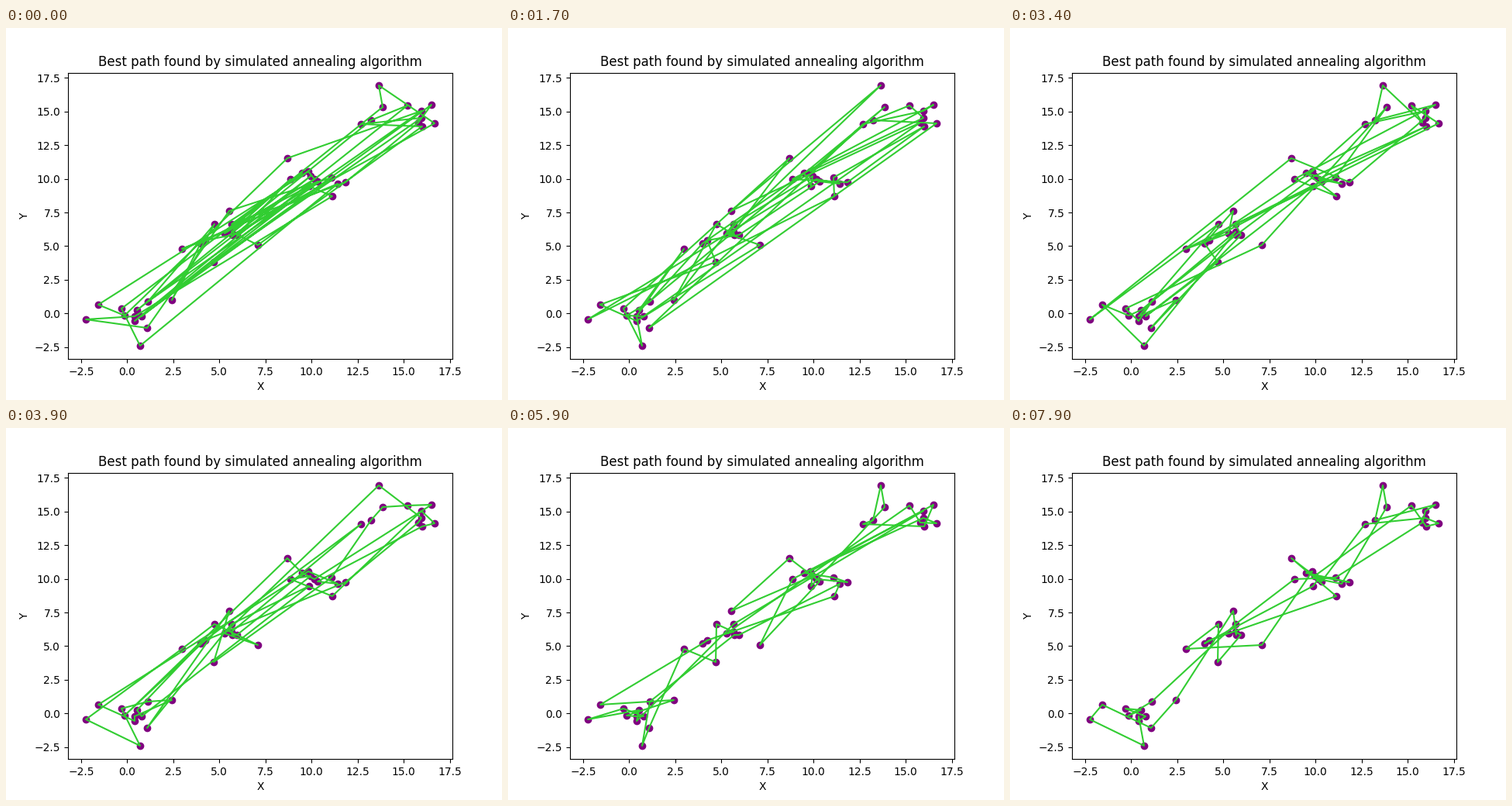
A matplotlib script for the animation above (8 s loop, 640 by 480 pixels).

```python
import random

import numpy as np
import matplotlib.pyplot as plt
from matplotlib.animation import FuncAnimation

FRAMES, INTERVAL = 80, 100
TRIALS = 200                     # proposed moves per frame
FIRST_LENGTH, LAST_LENGTH = 400, 130

# City positions on the 640 x 480 stage, one group per cluster
south = [(103, 376), (119, 357), (149, 362), (153, 371), (166, 372), (166, 378),
         (169, 364), (175, 372), (183, 353), (182, 387), (173, 410), (214, 351)]
lower = [(227, 285), (251, 278), (257, 274), (268, 302), (269, 253), (282, 265),
         (291, 253), (292, 267), (298, 267), (288, 236), (325, 280), (291, 263)]
upper = [(363, 168), (367, 195), (382, 187), (390, 185), (391, 204), (393, 191),
         (398, 195), (402, 198), (420, 193), (421, 217), (428, 201), (438, 199)]
north = [(458, 124), (471, 119), (481, 74), (486, 102), (518, 100), (532, 122),
         (536, 107), (536, 116), (537, 127), (549, 99), (553, 123)]


def to_data(px, py):
    return (px - 156.3) / 23.8, (368.2 - py) / 17.36


cities = np.array([to_data(*p) for p in south + lower + upper + north])
gaps = np.linalg.norm(cities[:, None] - cities[None], axis=2)


def length(route):
    return gaps[route, np.roll(route, -1)].sum()


def anneal():
    """Reverse random stretches while the tour stays under a falling limit."""
    rng = random.Random(7)
    n = len(cities)
    route = list(range(n))
    rng.shuffle(route)
    total = length(route)
    history = []
    for frame in range(FRAMES):
        progress = frame / (FRAMES - 1)
        limit = FIRST_LENGTH * (LAST_LENGTH / FIRST_LENGTH) ** progress
        for _ in range(TRIALS):
            i, j = sorted(rng.sample(range(n), 2))
            a, b = route[i - 1], route[i]
            c, d = route[j], route[(j + 1) % n]
            if a == c:
                continue
            change = gaps[a, c] + gaps[b, d] - gaps[a, b] - gaps[c, d]
            if total + change <= max(total, limit):
                route[i:j + 1] = route[i:j + 1][::-1]
                total += change
        history.append(route[:])
    return history


routes = anneal()

fig, ax = plt.subplots(figsize=(6.4, 4.8), dpi=100)
ax.scatter(*cities.T, color="purple")
path, = ax.plot([], [], color="limegreen", lw=1.5)
ax.set_title("Best path found by simulated annealing algorithm")
ax.set_xlabel("X")
ax.set_ylabel("Y")
(left, top), (right, bottom) = to_data(80, 57.6), to_data(576, 427.2)
ax.set_xlim(left, right)
ax.set_ylim(bottom, top)


def update(frame):
    route = routes[frame]
    path.set_data(*cities[route + route[:1]].T)
    return path,


anim = FuncAnimation(fig, update, frames=FRAMES, interval=INTERVAL,
                     repeat=True, repeat_delay=0)
plt.show()
```
